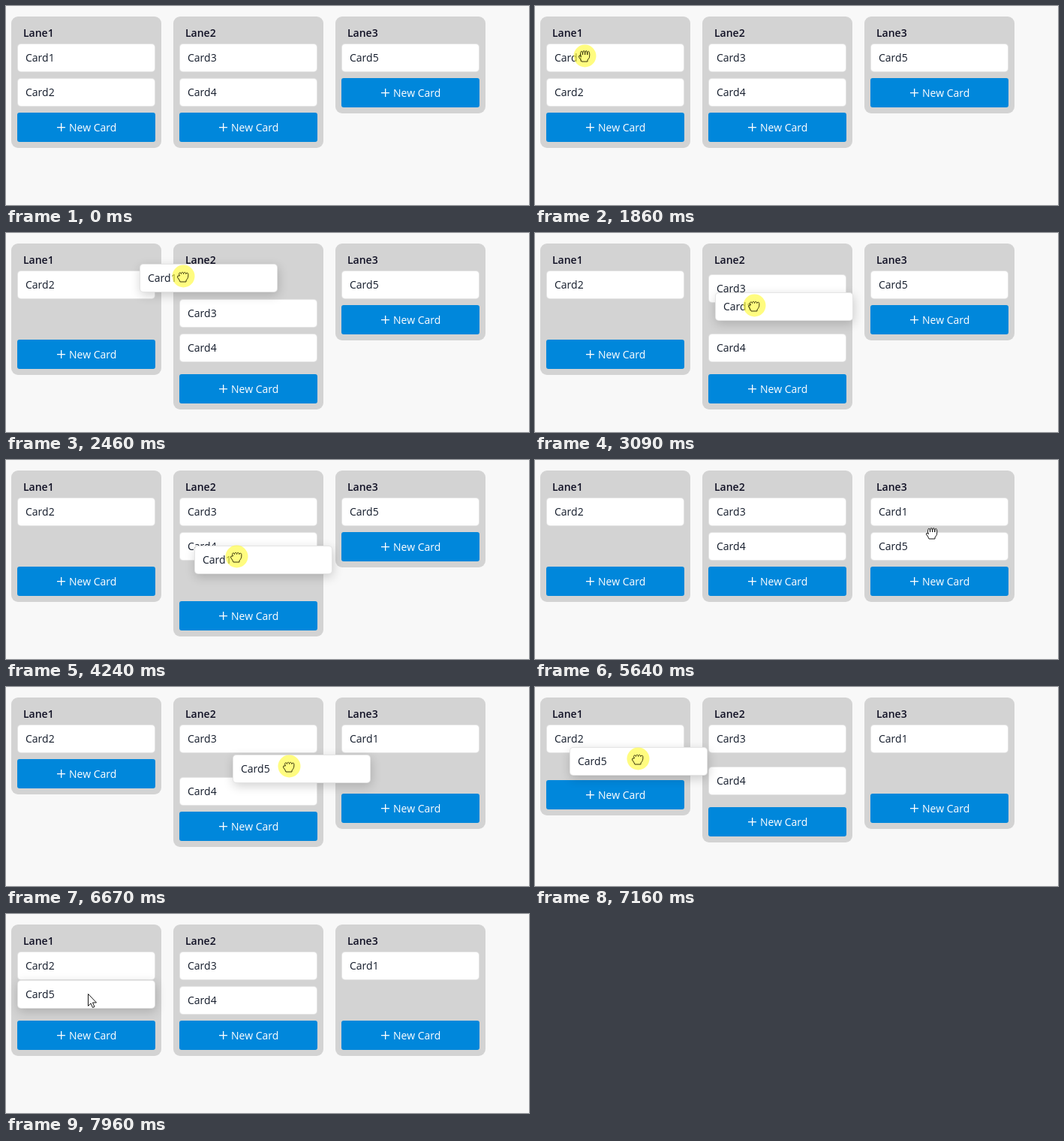
Write an HTML page with a canvas that moves like this. It is 697 px wide and 265 px high and loops after 8000 ms.

```html
<!DOCTYPE html>
<html lang="en">
<head>
<meta charset="utf-8">
<title>Card lanes</title>
<style>
html, body { margin: 0; width: 100%; height: 100%; overflow: hidden; background: #f8f8f8; }
canvas { display: block; }
</style>
</head>
<body>
<canvas id="stage" width="697" height="265"></canvas>
<script>
const ctx = document.getElementById('stage').getContext('2d', { alpha: false });
const LOOP = 8000;
const ROW = 46;       // card plus gap
const CARD_H = 38;
const TOP = 50;
const SETTLE = 250;
const LAG = 25;       // a dragged card trails the pointer
const FONT = '"Open Sans", "Noto Sans", sans-serif';

// Where the moving card's slot is: its old lane stays open until `home` changes.
const stage = (at, card, home, lane, slot, lifted = true) => ({ at, card, home, lane, slot, lifted });
const STAGES = [
  stage(0, 'Card1', 0, 0, 0, false),
  stage(2200, 'Card1', 0, 1, 0),
  stage(2940, 'Card1', 0, 1, 1),
  stage(3620, 'Card1', 0, 1, 2),
  stage(4500, 'Card1', 0, 2, 0),
  stage(5350, 'Card1', 0, 2, 0, false),
  stage(5640, 'Card1', 2, 2, 0, false),
  stage(6390, 'Card5', 2, 2, 1),
  stage(6579, 'Card5', 2, 1, 1),
  stage(7050, 'Card5', 2, 0, 1)
];

const DRAGS = {
  Card1: { from: 1920, drop: 5100, grip: [51, 17], lanes: [0, 2], y: TOP },
  Card5: { from: 6390, drop: 7700, grip: [92, 16], lanes: [2, 0], y: TOP + CARD_H }
};

// Pointer moves: start, end, target x and y.
const START = [565, 244];
const MOVES = [
  [260, 750, 34, 72], [970, 1510, 66, 67], [1900, 2600, 255, 57],
  [2670, 3150, 294, 99], [3440, 3910, 295, 134], [4130, 4880, 498, 48],
  [5100, 5600, 529, 98], [5780, 6250, 536, 112], [6300, 7160, 137, 96],
  [7230, 7440, 109, 106]
];

const clamp = p => Math.min(1, Math.max(0, p));
const mix = (a, b, p) => a + (b - a) * p;
const smooth = p => p * p * (3 - 2 * p);
const settle = (ms, power = 2.2) => 1 - Math.pow(1 - clamp(ms / SETTLE), power);
const laneX = i => 7 + 216 * i;

function follow(t, value, power) {
  return STAGES.reduce((v, s) => mix(v, value(s), settle(t - s.at, power)), value(STAGES[0]));
}

function pointer(t) {
  return MOVES.reduce(([x, y], [start, end, tx, ty]) => {
    const p = smooth(clamp((t - start) / (end - start)));
    return [mix(x, tx, p), mix(y, ty, p)];
  }, START);
}

const rows = s => [['Card2'], ['Card3', 'Card4'], [s.card === 'Card1' ? 'Card5' : 'Card1']];

function laneHeight(i, s) {
  const open = i === s.lane || i === s.home;
  return 83 + ROW * (rows(s)[i].length + open);
}

function cardTop(name, s) {
  if (name === s.card) return TOP + ROW * s.slot;
  const lane = rows(s).findIndex(row => row.includes(name));
  const rank = rows(s)[lane].indexOf(name);
  const pushed = lane === s.lane && rank >= s.slot;
  return TOP + ROW * rank + (pushed ? (s.lifted ? CARD_H : ROW) : 0);
}

function placeCard(name, lane, t) {
  const d = DRAGS[name];
  const rest = follow(t, s => cardTop(name, s));
  if (!d || t < d.from) return { name, x: laneX(lane) + 8, y: rest, lifted: false };
  const goal = laneX(d.lanes[1]) + 8;
  if (t > d.drop + SETTLE + 15) return { name, x: goal, y: rest, lifted: false };
  const p = settle(t - d.drop);
  const [x, y] = pointer(Math.min(t, d.drop) - LAG);
  return { name, x: mix(x - d.grip[0], goal, p), y: mix(y - d.grip[1], d.y, p), lifted: true };
}

function box(x, y, w, h, r, fill) {
  ctx.beginPath();
  ctx.roundRect(x, y, w, h, r);
  ctx.fillStyle = fill;
  ctx.fill();
}

function text(str, x, y, color, weight = 400) {
  ctx.font = `${weight} 14px ${FONT}`;
  ctx.fillStyle = color;
  ctx.fillText(str, x, y);
}

function drawLane(i, t) {
  const x = laneX(i);
  const h = Math.round(follow(t, s => laneHeight(i, s), 1.6)) - 37;
  const height = h + 37;
  const y = 14 + height - 47;
  box(x, 14, 200, height, 9, '#d3d3d3');
  text('Lane' + (i + 1), x + 16, 41, '#101024', 600);
  box(x + 8, y, 184, 39, 3, '#0087db');
  ctx.fillStyle = '#fff';
  ctx.fillRect(x + 61, y + 19, 11, 1.3);
  ctx.fillRect(x + 66, y + 14, 1.3, 11);
  text('New Card', x + 77, y + 25, '#fff', 500);
}

function drawCard({ name, x, y, lifted }) {
  x = Math.round(x);
  y = Math.round(y);
  ctx.save();
  if (lifted) {
    ctx.shadowColor = 'rgba(0,0,0,.18)';
    ctx.shadowBlur = 14;
    ctx.shadowOffsetX = 1;
    ctx.shadowOffsetY = 4;
  }
  box(x, y, 184, CARD_H, 5, '#e4e4e4');
  ctx.restore();
  box(x + 1, y + 1, 182, CARD_H - 2, 4, '#fff');
  text(name, x + 11, y + 24, '#141c2b');
}

function paint(fill, line) {
  ctx.closePath();
  if (fill) {
    ctx.fillStyle = '#fff';
    ctx.fill();
  }
  ctx.lineWidth = 1;
  ctx.lineJoin = 'round';
  ctx.strokeStyle = line;
  ctx.stroke();
}

// Four fingers over a palm; a fist only shows the knuckles.
function drawHand(x, y, fist, pressed) {
  const reach = fist ? 6.5 : 9.5;
  const valley = fist ? -3.5 : -2;
  ctx.save();
  ctx.translate(x, y);
  ctx.beginPath();
  ctx.moveTo(-4, 7);
  ctx.quadraticCurveTo(-5, 4, -7.5, 1);
  ctx.quadraticCurveTo(-8, -2, -4.5, fist ? -1 : 0.5);
  for (let i = 0; i < 4; i++) {
    const left = -5.5 + 3.1 * i;
    const tip = -reach + 0.5 * (i - 1.4) ** 2;
    ctx.lineTo(left, valley);
    ctx.bezierCurveTo(left, tip, left + 3, tip, left + 3, valley);
  }
  ctx.quadraticCurveTo(7.5, 2, 4, 5);
  ctx.lineTo(4, 7);
  paint(!pressed, pressed ? '#3a360c' : '#161616');
  ctx.restore();
}

function drawArrow(x, y) {
  ctx.beginPath();
  const points = [[0, 0], [0, 16], [3.5, 12.5], [6, 18], [8.5, 17], [6, 11.5], [11, 11.5]];
  points.forEach(([px, py]) => ctx.lineTo(x + px + 0.5, y + py + 0.5));
  paint(true, '#161616');
}

function drawPointer(t) {
  if (t < MOVES[0][0]) return;
  const [x, y] = pointer(t).map(Math.round);
  const drags = Object.values(DRAGS);
  const pressed = drags.some(d => t > d.from - 80 && t < d.drop);
  const fist = drags.some(d => t > d.from && t < d.drop);
  const dropping = drags.some(d => t >= d.drop && t < d.drop + 300);
  if (pressed) {
    ctx.beginPath();
    ctx.arc(x + 0.5, y - 0.5, 15, 0, Math.PI * 2);
    ctx.fillStyle = 'rgba(255,250,60,.65)';
    ctx.fill();
  }
  if (t < 700 || dropping) drawArrow(x, y);
  else drawHand(x, y, fist, pressed);
}

function draw(t) {
  ctx.fillStyle = '#f8f8f8';
  ctx.fillRect(0, 0, 697, 265);
  for (let i = 0; i < 3; i++) drawLane(i, t);
  [0, 0, 1, 1, 2]
    .map((lane, i) => placeCard('Card' + (i + 1), lane, t))
    .sort((a, b) => a.lifted - b.lifted)
    .forEach(drawCard);
  drawPointer(t);
}

const began = performance.now();
function tick() {
  draw((performance.now() - began) % LOOP);
  requestAnimationFrame(tick);
}
tick();
</script>
</body>
</html>
```
